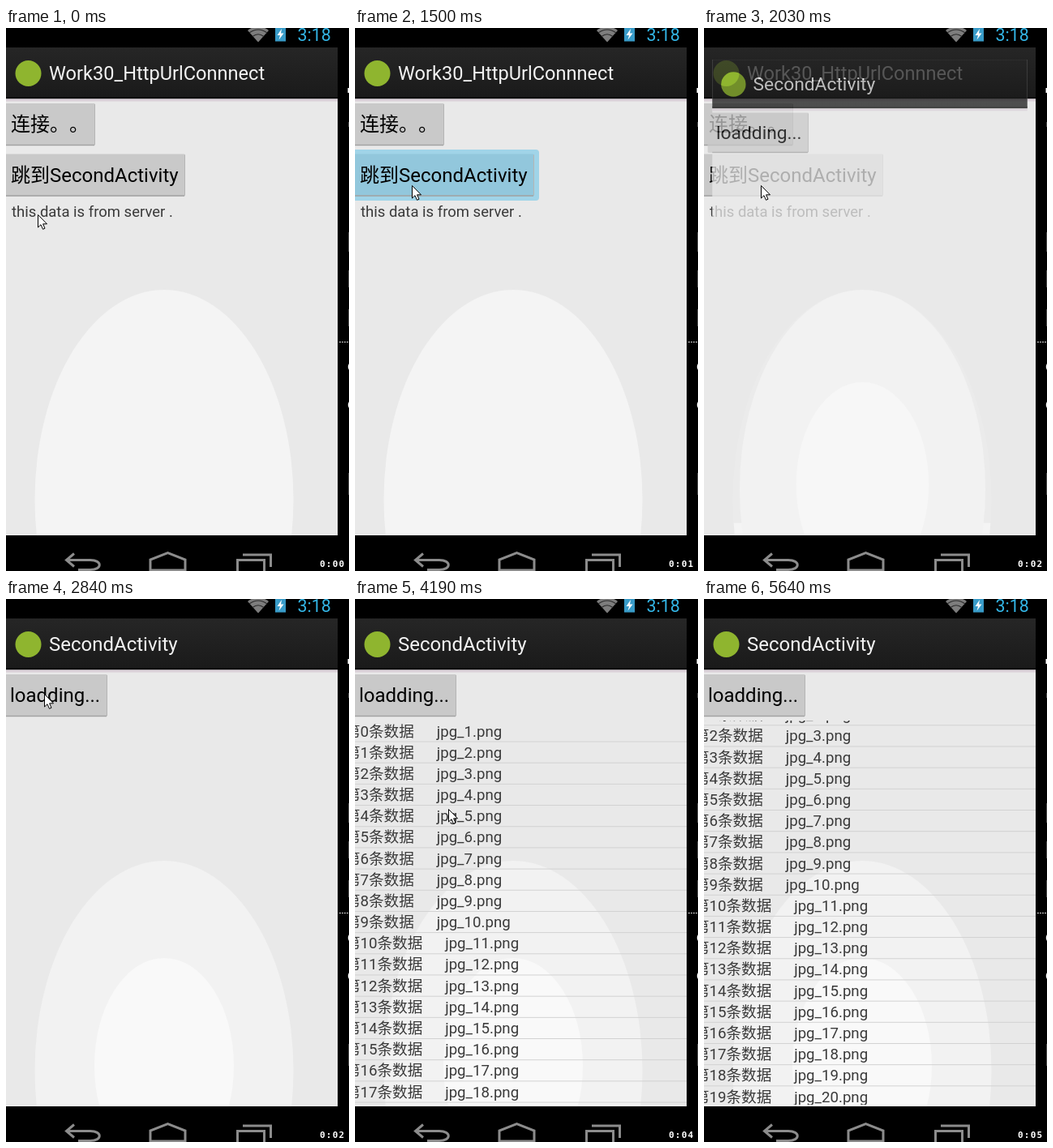
Recreate the animation shown at these times as an HTML page. Size 423 px wide and 670 px high, loop 6070 ms.

```html
<!DOCTYPE html>
<html lang="zh-CN">
<head>
<meta charset="utf-8">
<title>Activity demo</title>
<style>
html, body { margin: 0; width: 100%; height: 100%; overflow: hidden; background: #000; }
svg { display: block; }
text {
  font-family: Roboto, "Noto Sans CJK SC", "Noto Sans CJK", sans-serif;
  white-space: pre;
  text-spacing-trim: space-all;
}
.title { font-size: 24px; fill: #f3f3f3; }
.label { font-size: 24px; fill: #000; }
.small { font-size: 18.67px; fill: #3a3a3a; }
.nav { fill: none; stroke: #8c8c8c; stroke-width: 3; }
.count { font: bold 11px "DejaVu Sans Mono", monospace; letter-spacing: 1.2px; fill: #fff; }
</style>
</head>
<body>
<svg width="423" height="670" viewBox="0 0 423 670">
  <defs>
    <linearGradient id="bar" x2="0" y2="1">
      <stop stop-color="#262626"/><stop offset="1" stop-color="#1a1a1a"/>
    </linearGradient>
    <clipPath id="page"><rect y="24" width="409" height="602"/></clipPath>
    <clipPath id="listBox"><rect y="150" width="409" height="474"/></clipPath>
    <ellipse id="dome" cx="195" cy="582" rx="159.5" ry="259"/>
    <g id="chrome">
      <rect y="24" width="409" height="602" fill="#e9e9e9"/>
      <rect y="24" width="409" height="62" fill="url(#bar)"/>
      <rect y="85" width="409" height="2.5" fill="#0c0c0c"/>
      <rect y="87.5" width="409" height="3" fill="#dbd2d9"/>
      <circle cx="27.5" cy="56" r="16" fill="#8fb52f"/>
    </g>
  </defs>
  <rect width="423" height="670"/>

  <g clip-path="url(#page)">
    <g>
      <use href="#chrome"/>
      <use href="#dome" fill="#f4f4f4"/>
      <text class="title" x="53" y="64" style="font-size:23.6px">Work30_HttpUrlConnnect</text>
      <g data-button="93 110"></g>
      <text class="label" x="6" y="127">连接。。</text>
      <g id="jump" data-button="155.5 221"></g>
      <text class="label" x="6" y="190">跳到SecondActivity</text>
      <text class="small" x="7" y="233" style="font-size:18.5px">this data is from server .</text>
    </g>
    <g id="second">
      <use href="#chrome"/>
      <use href="#dome" fill="#f2f2f2"/>
      <ellipse cx="195" cy="576" rx="86" ry="133" fill="#f9f9f9"/>
      <text class="title" x="53" y="64">SecondActivity</text>
      <g id="load" data-button="93 125"></g>
      <text class="label" x="5" y="127">loadding...</text>
      <g id="list" clip-path="url(#listBox)">
        <g id="rows"></g>
        <rect id="thumb" x="400" y="197" width="5" height="425" fill="#8f8f8f"/>
      </g>
    </g>
  </g>

  <!-- status bar -->
  <path d="M298 3Q311 -7 324 3L311 17.5Z" fill="#7d7d7d"/>
  <path d="M300 6Q311 -2 322 6M304 10.5Q311 5 318 10.5" fill="none" stroke="#2c2c2c" stroke-width="1.2"/>
  <rect x="332" y="-2" width="13" height="18.5" fill="#389bc8"/>
  <path d="M340 1L334.5 9H338L336.5 14.5L342.5 6.5H339Z" fill="#fff"/>
  <text x="359.5" y="15.5" font-size="21.33" fill="#33b5e5">3:18</text>

  <!-- navigation bar -->
  <g class="nav">
    <path d="M84 648.5L74.5 656.5L84 664.5M75 656.5H104C119 656.5 119 668.5 104 668.5H89"/>
    <path d="M178 669V656L199.5 647.5L221 656V669Z"/>
    <path d="M285.5 672V656.5H318.5V672M292 650H326.5V665"/>
  </g>

  <!-- slivers at the right edge -->
  <path d="M411 387.5H423" stroke="#ddd" stroke-dasharray="2 1"/>
  <path d="M421.5 74H423V80H421.5ZM423 414Q420.5 418 423 422ZM423 461Q420.5 465 423 469Z" fill="#fff"/>
  <path d="M422.5 116V122M422.5 252V276M422.5 299V320M422.5 347V368M422.5 549V576" stroke="#444"/>

  <text id="count" class="count" x="387" y="665"></text>
  <path id="cursor" d="M.5 .5V16L4 12.7L6.5 18.3L9 17.2L6.6 11.8H11.5Z" fill="#fff" stroke="#000"/>
</svg>
<script>
const LOOP = 6070;
const FIRST = 276, STEP = 134;  // the screen refreshes in even ticks
const PITCH = 26.18, SCROLL = 46.4;

const $ = id => document.getElementById(id);
const set = (el, attrs) => Object.entries(attrs).forEach(([k, v]) => el.setAttribute(k, v));
const clamp = v => Math.min(1, Math.max(0, v));
const ramp = (v, from, to) => clamp((v - from) / (to - from));

// Buttons: pressed glow below a face with a darker lower edge
for (const g of document.querySelectorAll('[data-button]')) {
  const [y, w] = g.dataset.button.split(' ').map(Number);
  g.innerHTML =
    `<rect class="glow" x="-6" y="${y - 5.5}" width="${w + 12}" height="63" rx="4" fill="#33b5e5" opacity="0"/>
     <rect class="face" x="-6" y="${y}" width="${w + 6}" height="52" rx="1.5" fill="#c9c9c9"/>
     <path d="M0 ${y + 51.5}H${w - 1}" stroke="#a2a2a2" stroke-width="1.5"/>
     <path d="M${w - .5} ${y + 1}V${y + 51}" stroke="#b5b5b5"/>`;
}

$('rows').innerHTML = Array.from({ length: 20 }, (_, i) => {
  const y = 150 + i * PITCH;
  return `<text class="small" x="-12.2" y="${y + 19.5}">第${i}条数据      jpg_${i + 1}.png</text>` +
    (i < 19 ? `<path d="M0 ${y + 26}H409" stroke="#d2d2d2"/>` : '');
}).join('');

// Pointer strokes: from tick, to tick, end point
const strokes = [
  { from: -1, to: 2, x: 106, y: 234 },
  { from: 4, to: 5, x: 86, y: 212 },
  { from: 6, to: 8, x: 70, y: 194 },
  { from: 13, to: 15, x: 64, y: 213 },
  { from: 15, to: 19, x: 47, y: 117 },
  { from: 24, to: 27, x: 120, y: 186 },
  { from: 27, to: 30, x: 113, y: 295 },
  { from: 31, to: 32, x: 116, y: 217 },
  { from: 32, to: 34, x: 129, y: 258 },
  { from: 34, to: 39, x: 345, y: 635 }
];

function pointer(tick) {
  let x = 39, y = 230;
  for (const s of strokes) {
    const u = ramp(tick, s.from, s.to);
    x += (s.x - x) * u;
    y += (s.y - y) * u;
  }
  return `translate(${Math.round(x)} ${Math.round(y)})`;
}

function press(id, on) {
  set($(id).querySelector('.glow'), { opacity: on ? .4 : 0 });
  set($(id).querySelector('.face'), { fill: on ? '#92c7dc' : '#c9c9c9' });
}

function draw(now) {
  const tick = Math.floor((now % LOOP - FIRST) / STEP);
  const seconds = Math.max(0, Math.floor((FIRST + tick * STEP) / 1005));
  const open = 1 - (1 - ramp(tick, 11, 15)) ** 2;
  const scrolled = tick >= 32;

  set($('cursor'), { transform: pointer(tick), visibility: tick < 40 ? 'visible' : 'hidden' });
  set($('second'), {
    opacity: open,
    transform: `translate(204.5 325) scale(${.8 + .2 * open}) translate(-204.5 -325)`
  });
  press('jump', tick >= 9 && tick < 11);
  press('load', tick === 22);
  set($('list'), { visibility: tick >= 23 ? 'visible' : 'hidden' });
  set($('rows'), { transform: `translate(0 ${scrolled ? -SCROLL : 0})` });
  set($('thumb'), { opacity: scrolled ? .8 * ramp(tick, 40, 37) : 0 });
  $('count').textContent = '0:0' + seconds;
}

const start = performance.now();
function frame() {
  draw(performance.now() - start);
  requestAnimationFrame(frame);
}
frame();
</script>
</body>
</html>
```
